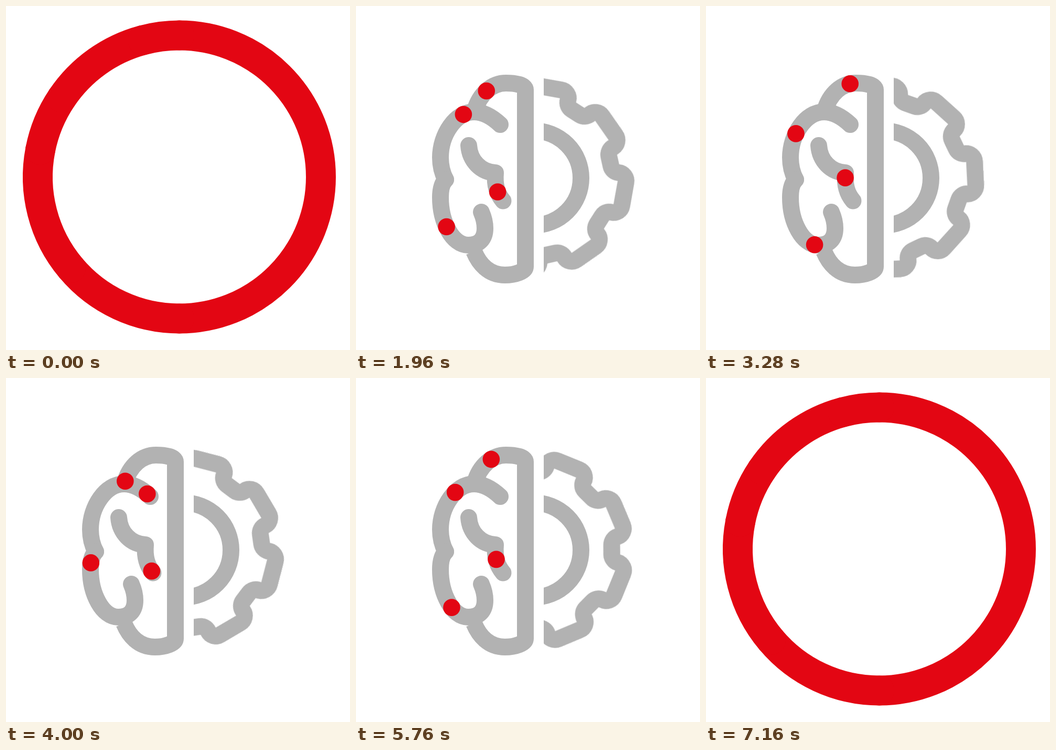
An HTML page that plays this animation: 656 px wide and 656 px high, repeating every 7760 ms.

```html
<!DOCTYPE html>
<html lang="en">
<head>
<meta charset="utf-8">
<title>Brain and gear</title>
<style>
  html, body { margin: 0; width: 100%; height: 100%; overflow: hidden; background: #fff; }
  svg { display: block; width: 656px; height: 656px; }

  #icon, #dots, #ring { animation: 7760ms step-end infinite; }
  #icon { animation-name: icon; fill: none; stroke: #b2b2b2; stroke-width: 32; stroke-linejoin: round; }
  #dots { animation-name: dots; fill: #e30613; }
  #ring { animation-name: ring; fill: none; stroke: #e30613; stroke-linecap: round; }
  @keyframes icon { 0% { opacity: 0 } 17.91% { opacity: 1 } 80.28%, 100% { opacity: 0 } }
  @keyframes dots { 0% { opacity: 0 } 18.43% { opacity: 1 } 79.77%, 100% { opacity: 0 } }
  @keyframes ring { 0% { opacity: 1 } 18.43% { opacity: 0 } 79.77%, 100% { opacity: 1 } }

  /* each arc of the ring collapses to its own point and grows back */
  #ring path {
    vector-effect: non-scaling-stroke;
    animation: gather 7760ms cubic-bezier(.65, 0, .35, 1) infinite;
  }
  @keyframes gather {
    0%, 7.732% { transform: scale(1); stroke-width: 57px; }
    19.137%, 80.99% { transform: scale(.002); stroke-width: 34.5px; }
    92.268%, 100% { transform: scale(1); stroke-width: 57px; }
  }

  #gear { transform-origin: 339px 328px; animation: turn 7760ms linear infinite; }
  @keyframes turn {
    0%, 18.04% { transform: rotate(-48.5deg); }
    32.99% { transform: rotate(-20.4deg); }
    51.55% { transform: rotate(14.5deg); }
    65.98% { transform: rotate(48.7deg); }
    80.41%, 100% { transform: rotate(81deg); }
  }

  #dots circle {
    --from: 0%; --to: 100%; --out: linear; --back: linear;
    offset-rotate: 0deg;
    animation: travel 7760ms infinite;
  }
  @keyframes travel {
    0% { offset-distance: var(--from); }
    19.33%, 51.03% { offset-distance: var(--from); animation-timing-function: linear; }
    36.08%, 66.82% { offset-distance: var(--to); animation-timing-function: linear; }
    80.15%, 100% { offset-distance: var(--from); }
  }
  #dots .top { offset-path: path("M226 201C236 166 260 147 286 147C303 147 323 150 323 160"); }
  #dots .upper { offset-path: path("M275 226C258 210 241 202 225 202C190 202 161 245 161 289C161 304 164 318 171 331"); }
  #dots .lower {
    --from: 7%;
    offset-path: path("M171 331C164 338 161 350 161 365C161 412 184 456 214 456C236 456 246 443 246 424C246 412 243 402 239 393");
  }
  /* the inner dot eases quadratically */
  #dots .inner {
    animation-name: travel-inner;
    offset-path: path("M215 266C217 295 238 317 266 318C264 342 269 358 280.5 371.5");
  }
  @keyframes travel-inner {
    0% { offset-distance: 97%; }
    19.33%, 51.03% { offset-distance: 97%; animation-timing-function: cubic-bezier(.333, 0, .667, .333); }
    36.08%, 66.82% { offset-distance: 4%; animation-timing-function: cubic-bezier(.333, .667, .667, 1); }
    80.15%, 100% { offset-distance: 97%; }
  }
</style>
</head>
<body>
<svg viewBox="0 0 656 656">
  <clipPath id="half"><rect x="358" y="100" width="200" height="460"/></clipPath>

  <g id="icon">
    <path d="M226 201C236 166 260 147 286 147C303 147 323 150 323 160V497C323 506 304 513 284 513C252 513 234 490 225 468"/>
    <g stroke-linecap="round">
      <path d="M275 226C258 210 241 202 225 202C190 202 161 245 161 289C161 304 164 318 171 331"/>
      <path d="M171 331C164 338 161 350 161 365C161 412 184 456 214 456C236 456 246 443 246 424C246 412 243 402 239 393"/>
      <path d="M215 266C217 295 238 317 266 318C264 342 269 358 280.5 371.5"/>
    </g>
    <g clip-path="url(#half)">
      <circle cx="339" cy="328" r="90"/>
      <path id="gear"/>
    </g>
  </g>

  <g id="dots">
    <circle class="top" r="16.3"/>
    <circle class="upper" r="16.3"/>
    <circle class="lower" r="16.3"/>
    <circle class="inner" r="16.3"/>
  </g>

  <g id="ring"></g>
</svg>
<script>
  const polar = (cx, cy, r, deg) => {
    const a = deg * Math.PI / 180;
    return [cx + r * Math.cos(a), cy + r * Math.sin(a)];
  };
  const text = p => p.map(v => v.toFixed(2)).join(' ');

  // Ring arcs: start angle, end angle (clockwise from the right), gathering point
  const arcs = [
    [-90, 90, 357.5, 331],
    [90, 140, 284, 373],
    [140, 191, 163, 349.6],
    [191, 214, 274, 221],
    [214, 255, 228.2, 198.7],
    [255, 270, 274, 223]
  ];
  const ring = document.getElementById('ring');
  for (const [from, to, x, y] of arcs) {
    const path = document.createElementNS('http://www.w3.org/2000/svg', 'path');
    const [a, b] = [from, to].map(deg => text(polar(330.5, 326, 270, deg)));
    path.setAttribute('d', `M${a}A270 270 0 0 1 ${b}`);
    path.style.transformOrigin = `${x}px ${y}px`;
    ring.append(path);
  }

  // Gear outline: rounded tooth corners joined to rounded valley corners
  const at = (r, deg) => polar(339, 328, r, deg);
  const shift = (p, r, deg) => polar(p[0], p[1], r, deg);
  const middle = (p, q) => [(p[0] + q[0]) / 2, (p[1] + q[1]) / 2];
  let d = '';
  for (let c = 0; c < 360; c += 45) {
    const valley = c + 22.5;
    const tip1 = at(160, c - 8), tip2 = at(160, c + 8);
    const dip1 = at(165, valley - 3.2), dip2 = at(165, valley + 3.2);
    const next = at(160, c + 37);
    const arc = (sweep, p) => `A16 16 0 0 ${sweep} ${text(p)}`;
    d += (d ? 'L' : 'M') + text(shift(tip1, 16, c)) + 'L' + text(shift(tip2, 16, c))
      + arc(1, middle(tip2, dip1)) + arc(0, shift(dip1, -16, valley))
      + 'L' + text(shift(dip2, -16, valley))
      + arc(0, middle(dip2, next)) + arc(1, shift(next, 16, c + 45));
  }
  document.getElementById('gear').setAttribute('d', d + 'Z');
</script>
</body>
</html>
```
